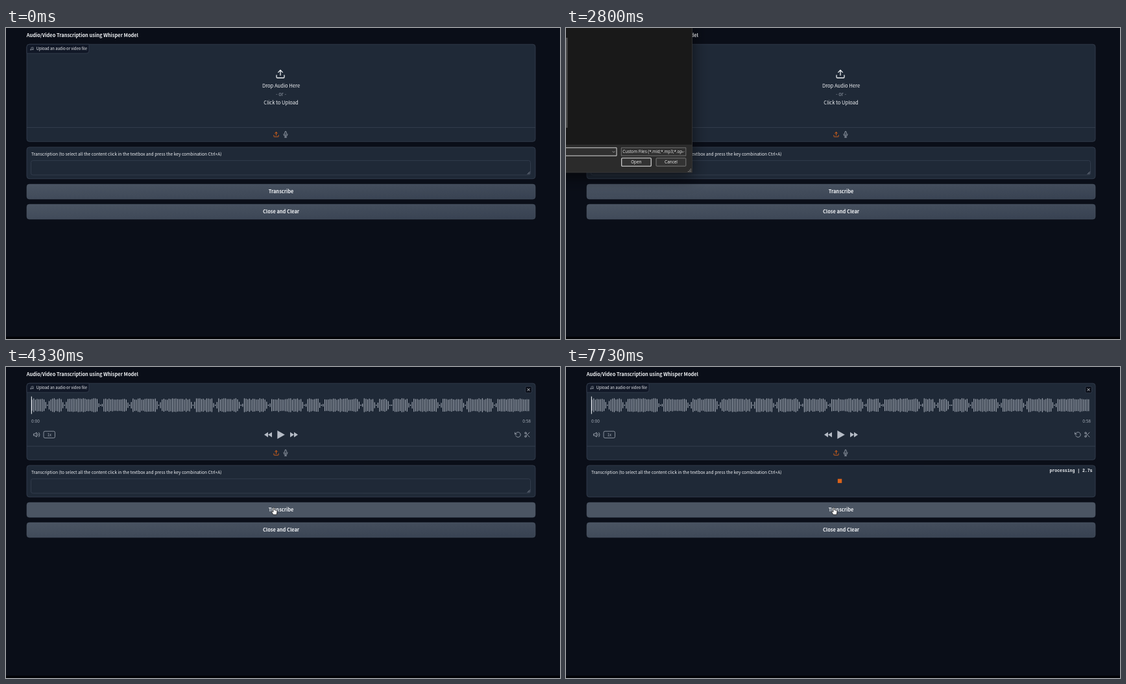
Write an HTML page with a canvas that moves like this. It is 854x480 px and loops after 8000 ms.

```html
<!DOCTYPE html>
<html lang="en">
<head>
<meta charset="utf-8">
<title>Audio transcription demo</title>
<style>
html, body { margin: 0; width: 100%; height: 100%; overflow: hidden; background: #0b0f19; }
canvas { display: block; }
</style>
</head>
<body>
<canvas id="stage" width="854" height="480"></canvas>
<script>
const ctx = document.getElementById('stage').getContext('2d');
const LOOP = 8000, FRAME = 1000 / 15;
const SANS = '"Noto Sans CJK SC", "Noto Sans CJK JP", "Noto Sans CJK KR", "Noto Sans CJK TC", "Noto Sans CJK", sans-serif';
const SYSTEM = '"Open Sans", "Noto Sans", sans-serif';
const MONO = '"Liberation Mono", monospace';
const LINE = '#374151', PANEL = '#1f2937', GREY = '#a4abb6', WHITE = '#f0f2f5', ORANGE = '#d9621a';
const LEFT = 32, RIGHT = 816;

const ICONS = {
  upload: 'M21 15v4a2 2 0 0 1-2 2H5a2 2 0 0 1-2-2v-4M17 8l-5-5-5 5M12 3v12',
  mic: 'M12 1a3 3 0 0 0-3 3v8a3 3 0 0 0 6 0V4a3 3 0 0 0-3-3zM19 10v2a7 7 0 0 1-14 0v-2M12 19v4M8 23h8',
  music: 'M9 18V5l12-2v13M9 18a3 3 0 1 1-6 0 3 3 0 1 1 6 0M21 16a3 3 0 1 1-6 0 3 3 0 1 1 6 0',
  volume: 'M11 5L6 9H2v6h4l5 4zM15.5 8.5a5 5 0 0 1 0 7M19 5a10 10 0 0 1 0 14',
  undo: 'M1 4v6h6M3.5 15a9 9 0 1 0 2.1-9.4L1 10',
  scissors: 'M9 6a3 3 0 1 1-6 0 3 3 0 1 1 6 0M9 18a3 3 0 1 1-6 0 3 3 0 1 1 6 0M20 4L8.1 15.9M14.5 14.5L20 20M8.1 8.1L12 12',
  cross: 'M5 5l14 14M19 5L5 19',
  chevron: 'M5 9l7 7 7-7'
};
const ARROW = new Path2D('M0 0V9.4L2.2 7.4 3.6 10.6 5.1 9.9 3.7 6.8H6.6Z');
const HAND = new Path2D('M-1 1Q0-.7 1 1V4.2L4 4.8Q5.4 5.2 5.2 6.8L4.4 11.4H-.8L-3.2 7.6Q-3.6 6.2-2.3 6.4L-1 7.4Z');

// Pointer path: time, x, y
const POINTER = [
  [1000, 312, 395], [1130, 310, 300], [1200, 314, 245], [1270, 324.5, 194.5],
  [1470, 356, 128], [1730, 372, 108], [2200, 372, 108], [2400, 240, 118],
  [2700, -15, 100], [3930, -12, 10], [4070, 62, 20], [4200, 280, 145], [4330, 412.8, 216.5]
];
// Pauses in the speech, as x positions
const PAUSES = [64.5, 90, 146, 190, 236, 287, 323, 361, 405, 459, 485, 547.5, 571, 592.5, 622, 667, 707, 752];

function box(x, y, w, h, r, fill, stroke, width = 0.8) {
  ctx.beginPath();
  ctx.roundRect(x, y, w, h, r);
  if (fill) { ctx.fillStyle = fill; ctx.fill(); }
  if (stroke) { ctx.strokeStyle = stroke; ctx.lineWidth = width; ctx.stroke(); }
}

// y is the middle of the capital letters
function text(s, x, y, size, color = WHITE, { align = 'left', weight = 400, font = SANS } = {}) {
  ctx.font = `${weight} ${size}px ${font}`;
  ctx.textAlign = align;
  ctx.fillStyle = color;
  ctx.fillText(s, x, y + size * 0.36);
}

function icon(name, x, y, scale, color, width = 2) {
  ctx.save();
  ctx.translate(x, y);
  ctx.scale(scale, scale);
  ctx.translate(-12, -12);
  ctx.strokeStyle = color;
  ctx.lineWidth = width;
  ctx.lineCap = ctx.lineJoin = 'round';
  ctx.stroke(new Path2D(ICONS[name]));
  ctx.restore();
}

function triangle(x, y, w, h) {
  ctx.beginPath();
  ctx.moveTo(x, y - h / 2);
  ctx.lineTo(x + w, y);
  ctx.lineTo(x, y + h / 2);
  ctx.fill();
}

function divider(y) {
  ctx.fillStyle = LINE;
  ctx.fillRect(LEFT, y, RIGHT - LEFT, 0.8);
}

function sourceIcons(y) {
  icon('upload', 416.5, y, 0.4, ORANGE, 2.4);
  icon('mic', 431, y, 0.41, GREY);
}

function button(label, y, hover) {
  const cx = (LEFT + RIGHT) / 2, cy = y + 11.5;
  const g = ctx.createLinearGradient(cx - 0.67, cy - 23, cx + 0.67, cy + 23);
  g.addColorStop(0, '#4b5563');
  g.addColorStop(1, hover ? '#4b5563' : LINE);
  box(LEFT, y, RIGHT - LEFT, 23, 4, g, '#4b5563', 0.6);
  text(label, cx, cy, 7.43, WHITE, { align: 'center', weight: 700 });
}

function dropArea() {
  const center = { align: 'center' };
  icon('upload', 423, 71, 0.667, WHITE, 1.9);
  text('Drop Audio Here', 424, 89.5, 7.6, WHITE, center);
  text('- or -', 424, 102.5, 7.5, '#9097a3', center);
  text('Click to Upload', 424, 115, 7.55, WHITE, center);
  divider(153.2);
  sourceIcons(164.3);
}

function uploading() {
  text('Uploading 1 file...', 424, 59, 7.55, WHITE, { align: 'center', weight: 500 });
  ctx.strokeStyle = '#7d8592';
  ctx.lineWidth = 0.9;
  ctx.beginPath();
  ctx.arc(404.5, 74, 3, 0, 7);
  ctx.stroke();
  text('test.mp3', 412, 74.5, 7.6, '#b4bac4');
  sourceIcons(121.5);
}

function waveform() {
  ctx.fillStyle = '#a2a9b4';
  for (let i = 0; i < 291; i++) {
    const x = 39.5 + i * 2.64;
    const gap = Math.min(...PAUSES.map(p => Math.abs(p - x)));
    const noise = Math.abs(Math.sin(i * 12.9898) * 43758.5) % 1;
    const h = gap < 1.4 ? 2 : gap < 4 ? 4 + 9 * noise : 17 + 4.5 * noise;
    ctx.fillRect(x, 59 - h / 2, 1.2, h);
  }
  ctx.fillStyle = WHITE;
  ctx.fillRect(38.8, 45.5, 1.1, 27);
}

function player() {
  waveform();
  text('0:00', 39, 84, 6.6, GREY);
  text('0:58', 809, 84, 6.6, GREY, { align: 'right' });
  box(800.5, 30, 10, 10, 2, '#0b0f19', LINE);
  icon('cross', 805.5, 35, 0.25, WHITE, 3);
  icon('volume', 47.3, 104.5, 0.47, GREY);
  box(58, 99.2, 17.5, 10.3, 2, null, GREY);
  text('1x', 66.8, 104.5, 5.9, GREY, { align: 'center' });
  ctx.fillStyle = '#b6bcc6';
  triangle(418.3, 104.5, 11.5, 13);
  for (const d of [0, 6]) {
    triangle(410 - d, 104.5, -6, 8);
    triangle(438 + d, 104.5, 6, 8);
  }
  icon('undo', 789.3, 104.5, 0.43, GREY);
  icon('scissors', 803.5, 104.5, 0.43, GREY);
  divider(121.8);
  sourceIcons(132.5);
}

function transcription(top, t) {
  box(LEFT, top, RIGHT - LEFT, 48.8, 4, PANEL, LINE);
  text('Transcription (to select all the content click in the textbox and press the key combination Ctrl+A)',
    39, top + 11, 6.62);
  if (t < 5060) {
    box(38.5, top + 20.7, 770, 22.3, 3, PANEL, LINE);
    ctx.strokeStyle = GREY;
    ctx.lineWidth = 0.7;
    for (const d of [2, 4]) {
      ctx.beginPath();
      ctx.moveTo(807.7 - d, top + 41.8);
      ctx.lineTo(807.7, top + 41.8 - d);
      ctx.stroke();
    }
    return;
  }
  const seconds = Math.max(0, Math.floor((t - 5030) / 100) / 10).toFixed(1);
  text(`processing | ${seconds}s`, 811.5, top + 7.3, 6.47, WHITE, { align: 'right', weight: 700, font: MONO });
  const sway = Math.sin((t - 5060) / 250);
  ctx.fillStyle = ORANGE;
  ctx.fillRect(419.8 + sway, top + 20.8, 6.4, 6.4);
}

function dialog(scale, alpha) {
  const label = { align: 'center', font: SYSTEM };
  ctx.save();
  ctx.globalAlpha = alpha;
  ctx.translate(-65, 64);
  ctx.scale(scale, scale);
  ctx.translate(65, -64);
  ctx.save();
  ctx.shadowColor = 'rgba(0,0,0,.55)';
  ctx.shadowBlur = 22;
  ctx.shadowOffsetY = 8;
  ctx.fillStyle = '#191919';
  ctx.fillRect(-325, -95, 519.5, 318);
  ctx.restore();
  ctx.fillStyle = '#2b2b2b';
  ctx.fillRect(-325, 180, 519.5, 43);
  ctx.strokeStyle = '#3c3c3c';
  ctx.lineWidth = 0.7;
  ctx.strokeRect(-325, -95, 519.5, 318);
  ctx.fillStyle = '#4d4d4d';
  ctx.fillRect(-1, 15, 3.5, 139);
  box(-200, 184.8, 278, 12.4, 0, '#303030', '#d8d8d8', 1);
  icon('chevron', 73.5, 191.2, 0.23, '#ccc', 3);
  box(85.3, 184.8, 99.5, 12.4, 0, '#303030', '#858585');
  text('Custom Files (*.mid;*.mp3;*.op', 87.3, 191, 6.3, '#eee', { font: SYSTEM });
  icon('chevron', 180.3, 191.2, 0.23, '#ccc', 3);
  box(85.7, 200.8, 45.5, 12.4, 1, '#333', '#e8e8e8', 1.1);
  text('Open', 108.3, 207, 6.3, '#f4f4f4', label);
  box(139, 200.8, 45.8, 12.4, 1, '#333', '#8c8c8c');
  text('Cancel', 162, 207, 6.4, '#f4f4f4', label);
  ctx.fillStyle = '#aaa';
  for (let r = 0; r < 3; r++)
    for (let c = 0; c <= r; c++) ctx.fillRect(191.8 - c * 1.9, 217.3 + r * 1.9, 1, 1);
  ctx.restore();
}

function pointerAt(t) {
  if (t < POINTER[0][0] - 5) return [-50, -50];
  const i = POINTER.findIndex(p => p[0] > t);
  if (i < 1) return POINTER.at(i).slice(1);
  const [t0, x0, y0] = POINTER[i - 1], [t1, x1, y1] = POINTER[i];
  const k = (t - t0) / (t1 - t0);
  return [x0 + (x1 - x0) * k, y0 + (y1 - y0) * k];
}

function drawPointer(x, y, hand) {
  ctx.save();
  ctx.translate(x, y);
  ctx.fillStyle = '#fff';
  ctx.strokeStyle = '#111';
  ctx.lineWidth = 0.8;
  ctx.lineJoin = 'round';
  const shape = hand ? HAND : ARROW;
  ctx.fill(shape);
  ctx.stroke(shape);
  ctx.restore();
}

function draw(t) {
  const stage = t < 3320 ? 0 : t < 3790 ? 1 : 2;
  const bottom = [175.3, 132.8, 143.3][stage], top = bottom + 8.6;
  const [px, py] = pointerAt(t);
  const over = y => px > LEFT && px < RIGHT && py > y && py < y + 23;

  ctx.fillStyle = '#0a0e18';
  ctx.fillRect(0, 0, 854, 480);
  ctx.fillStyle = '#020306';
  ctx.fillRect(0, 476.5, 854, 3.5);

  text('Audio/Video Transcription using Whisper Model', 31.7, 11, 7.43, WHITE, { weight: 700 });
  box(LEFT, 25.2, RIGHT - LEFT, bottom - 25.2, 4, PANEL, LINE);
  box(LEFT, 25.2, 96, 14, [4, 0, 4, 0], '#111827', LINE);
  icon('music', 39.7, 32, 0.25, GREY, 2.4);
  text('Upload an audio or video file', 46.8, 32, 5.85, WHITE, { weight: 500 });
  [dropArea, uploading, player][stage]();

  transcription(top, t);
  const first = top + 57.2, second = top + 88.2;
  button('Transcribe', first, over(first));
  button('Close and Clear', second, over(second));

  if (t > 2125 && t < 3260) {
    const p = Math.min(1, (t - 2066) / 200);
    dialog(0.9 + 0.1 * p, p);
  } else if (t >= 3260 && t < 3530) {
    const p = (t - 3260) / 270;
    dialog(1 - 0.1 * p, (1 - p) ** 1.75);
  }
  const dropHover = stage === 0 && t < 2190 && py > 25 && py < bottom;
  drawPointer(px, py, dropHover || over(first) || over(second));
}

const start = performance.now();
function tick() {
  const t = (performance.now() - start) % LOOP;
  draw(Math.floor(t / FRAME + 0.06) * FRAME);
  requestAnimationFrame(tick);
}
tick();
</script>
</body>
</html>
```
